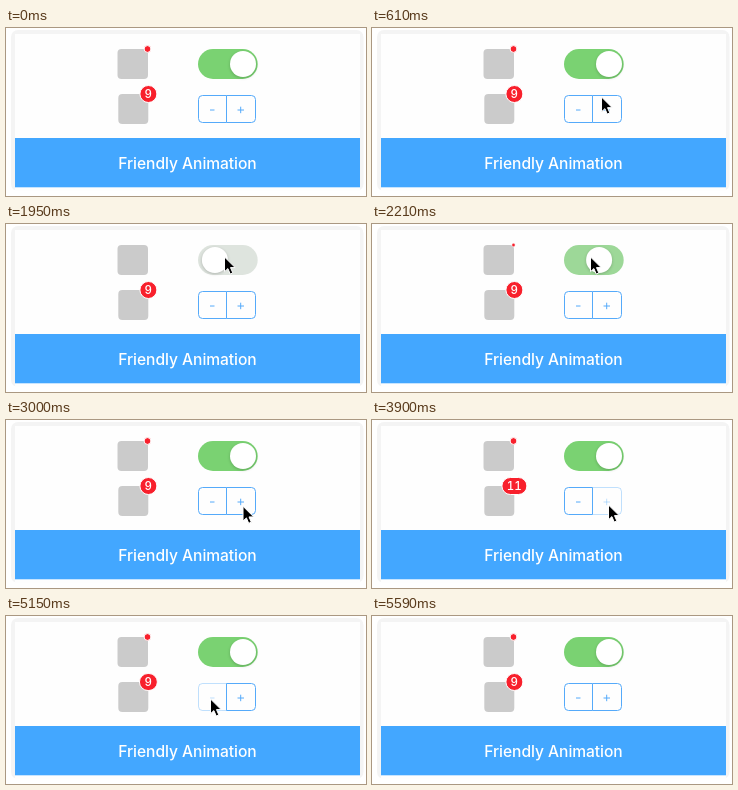
Animation of 360 by 168 pixels, one loop 5980 ms. Source, as an HTML page:

```html
<!DOCTYPE html>
<html lang="en">
<head>
<meta charset="utf-8">
<title>Friendly Animation</title>
<style>
  html, body { margin: 0; width: 100%; height: 100%; overflow: hidden; background: #fff; }
  svg { display: block; width: 360px; height: 168px; }
  text { font-family: Inter, Roboto, sans-serif; font-weight: 500; fill: #fff; text-anchor: middle; }
  .line { fill: none; stroke: #55aafa; }
  .red { fill: #f8202c; stroke: #fff; }
  #count { font-variant-numeric: tabular-nums; }
  #knob { filter: drop-shadow(0 1px 1.5px rgba(0, 0, 0, .2)); }
</style>
</head>
<body>
<svg viewBox="0 0 360 168">
  <rect x="5" y="2" width="352.5" height="161" rx="7" fill="#f4f4f4"/>
  <rect x="9" y="6" width="345" height="157" fill="#fefefe"/>
  <rect x="9" y="110" width="345" height="49.3" fill="#43a7ff"/>
  <text x="181.5" y="141" font-size="15.6" letter-spacing="-.05">Friendly Animation</text>

  <rect x="111.5" y="21" width="30.5" height="30" rx="4" fill="#cbcbcb"/>
  <rect x="112.3" y="66" width="30" height="30" rx="4" fill="#cbcbcb"/>

  <circle id="dot" class="red" cx="141.5" cy="21"/>
  <rect id="badge" class="red" y="57.5" height="17" rx="8.5"/>
  <text id="count" x="142.2" y="70" font-size="11.5"></text>

  <rect id="track" x="192" y="21" width="59.7" height="30" rx="15"/>
  <circle id="knob" cy="36" r="13" fill="#fff"/>

  <g class="line">
    <path id="minus" d="M220.5 67.5H196.5a4 4 0 0 0-4 4v19a4 4 0 0 0 4 4h24M204 82h4.500"/>
    <path id="plus" d="M220.5 67.5H245.5a4 4 0 0 1 4 4v19a4 4 0 0 1-4 4h-25M231.500 82h6.500M234.700 78.700v6.500"/>
    <path d="M220.5 67.500v27"/>
  </g>

  <path id="cursor" d="M0 0V14.700L3.400 11.600L5.700 17L8.300 15.900L6 10.600H10.700Z"
        fill="#000" stroke="#fff" stroke-linejoin="round"/>
</svg>
<script>
const LOOP = 5980, STEP = 88.7; // the motion advances in fixed steps

// Cursor legs: first step, last step, end point
const LEGS = [[3, 9, 218.5, 33], [27.3, 32, 238.5, 90], [32, 35, 236.5, 85],
  [44, 48, 204.5, 83], [58, 63, 304, 174]];
// Stepper presses: step pressed, step released, change of the count
const PRESSES = [[37, 37, 1], [42, 43, 1], [49, 51, -1], [55, 57, -1]];

const el = id => document.getElementById(id);
const set = (id, attrs) => {
  for (const name in attrs) el(id).setAttribute(name, attrs[name]);
};
const mix = (a, b, u) => a + (b - a) * u;
const span = (k, a, b) => Math.min(1, Math.max(0, (k - a) / (b - a)));
const smooth = u => u * u * (3 - 2 * u);
const badgeSize = n => n > 9 ? 12.5 : 8.5;

function drawCursor(k) {
  let x = 261, y = 172;
  for (const [a, b, endX, endY] of LEGS) {
    const u = smooth(span(k, a, b));
    x = mix(x, endX, u);
    y = mix(y, endY, u);
  }
  set('cursor', { transform: `translate(${x} ${y})` });
}

function drawSwitch(k) {
  const on = 1 - span(k, 11, 16) ** 3 + smooth(span(k, 21, 27.5));
  const color = [122, 210, 114].map(v => mix(229, v, on));
  const dot = 1 - span(k, 11, 14) + span(k, 23, 27);
  set('track', { fill: `rgb(${color})` });
  set('knob', { cx: mix(207, 237, on) });
  set('dot', { r: 3.4 * dot, 'stroke-width': dot });
}

function drawStepper(k) {
  const opacity = { plus: 1, minus: 1 };
  let count = 9, half = badgeSize(count);
  for (const [down, up, change] of PRESSES) {
    if (k >= down && k < up + 2) opacity[change > 0 ? 'plus' : 'minus'] = .37;
    if (k >= up) count += change;
    const left = 1 - span(k, up - 1, up + 2);
    if (k >= up) half = mix(badgeSize(count), badgeSize(count - change), left * left);
  }
  for (const id in opacity) set(id, { opacity: opacity[id] });
  set('badge', { x: 142.4 - half, width: 2 * half });
  el('count').textContent = count;
}

const start = performance.now();
function tick() {
  const k = Math.floor(((performance.now() - start) % LOOP + 16) / STEP);
  drawCursor(k);
  drawSwitch(k);
  drawStepper(k);
  requestAnimationFrame(tick);
}
tick();
</script>
</body>
</html>
```
